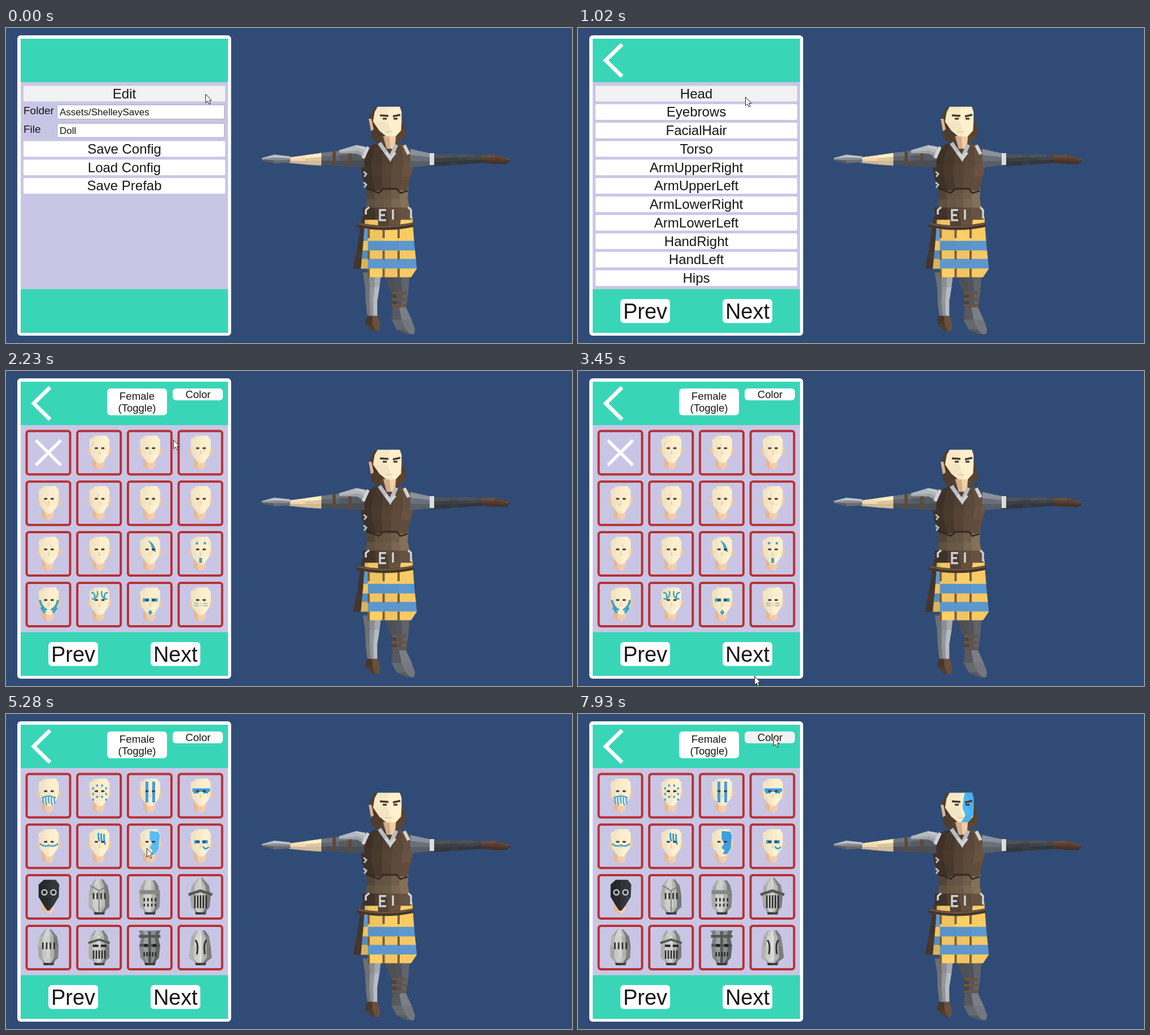
Animation of 1002 by 559 pixels, one loop 8 s. Source, as an HTML page:

```html
<!DOCTYPE html>
<html>
<head>
<meta charset="utf-8">
<style>
html, body { margin: 0; width: 100%; height: 100%; overflow: hidden; background: #304b76 }
svg { display: block; width: 1002px; height: 559px }
text { font-family: "Liberation Sans", Arial, sans-serif; fill: #161616 }
</style>
</head>
<body>
<svg id="stage" viewBox="0 0 1002 559"></svg>
<script>
const range = n => [...Array(n).keys()];
const each = (n, f) => range(n).map(f).join('');
const P = (fill, d) => `<path fill="${fill}" d="${d}"/>`;
const L = (color, width, d) => `<path fill="none" stroke="${color}" stroke-width="${width}" d="${d}"/>`;
const R = (x, y, w, h, fill = '#fff', r = 0, extra = '') =>
  `<rect x="${x}" y="${y}" width="${w}" height="${h}" rx="${r}" fill="${fill}" ${extra}/>`;
const T = (x, y, size, s, anchor = 'middle') =>
  `<text x="${x}" y="${y}" font-size="${size}" text-anchor="${anchor}">${s}</text>`;
const G = (id, body) => `<g id="${id}">${body}</g>`;

let seed = 7;
const random = () => (seed = seed * 16807 % 2147483647) / 2147483647;
const shade = (hex, k) => `rgb(${[1, 3, 5].map(i => Math.min(255, Math.round(parseInt(hex.slice(i, i + 2), 16) * k)))})`;
const mix = (a, b, t) => a + (b - a) * t;

// Faceted surface through sections [position, near edge, far edge]; flat surfaces run left to right
function mesh(sections, cols, base, light = [.68, 1.14], flat = false, noise = .14) {
  const at = ([s, a, b], t) => flat ? [s, mix(a, b, t)] : [mix(a, b, t), s];
  const facet = (i, j) => {
    const [a, b] = [sections[i], sections[i + 1]], t = j / cols, u = (j + 1) / cols;
    const hex = typeof base === 'string' ? base : base(i, j);
    const k = typeof light === 'function' ? light((t + u) / 2) : mix(...light, (t + u) / 2);
    const fill = shade(hex, k + (random() - .5) * noise);
    return `<path fill="${fill}" stroke="${fill}" stroke-width=".6" d="M${at(a, t)}L${at(a, u)}L${at(b, u)}L${at(b, t)}z"/>`;
  };
  return each(sections.length - 1, i => each(cols, j => facet(i, j)));
}

// Panel views
const button = (x, y, w, h, r) => R(x, y, w, h, '#fff', r, 'class="button"');
const row = (i, s) => button(31, 102.6 + 32.75 * i, 357, 27.6, 2) + T(209.5, 124.7 + 32.75 * i, 24, s);
const field = (y, label, value) => T(31, y + 17, 19, label, 'start') +
  R(90.5, y + .5, 296, 25, '#fff', 2, 'stroke="#aaa8bd"') + T(95, y + 19, 17, value, 'start');
const mainView = row(0, 'Edit') + field(136, 'Folder', 'Assets/ShelleySaves') + field(168.7, 'File', 'Doll') +
  ['Save Config', 'Load Config', 'Save Prefab'].map((s, i) => row(i + 3, s)).join('');
const listView = ['Head', 'Eyebrows', 'FacialHair', 'Torso', 'ArmUpperRight', 'ArmUpperLeft', 'ArmLowerRight',
  'ArmLowerLeft', 'HandRight', 'HandLeft', 'Hips'].map((s, i) => row(i, s)).join('');
const nav = L('#fff', 7, 'M78 29L49 57.500 78 86') +
  ['Prev', 'Next'].map((s, i) => button(75 + 181 * i, 481, 88, 42.5, 6) + T(119 + 181 * i, 516, 38, s)).join('');
const options = button(179, 31, 106, 47.5, 6) + T(232, 51, 18.7, 'Female') + T(232, 72, 18.5, '(Toggle)') +
  button(295, 31, 89, 21, 6) + T(340, 48, 18.7, 'Color');

// Heads, drawn around the tile centre
const pair = s => s + `<g transform="translate(2) scale(-1 1)">${s}</g>`;
const cyan = '#3fa3c0', blue = '#3d9fdf';
const neck = mesh([[8, -11, 10], [24, -12, 9], [29, -5, 4]], 3, '#f3c9a8', [.93, 1.04], false, .05);
const skull = neck + pair(P('#ecc7a5', 'M18-9l5 2l-3 12l-3-2z')) +
  mesh([[-30, -7, 13], [-23, -17, 18], [-7, -16, 18], [4, -14, 16], [15, -6, 8], [18, -3, 5]], 4, '#fbedcb',
    [.95, 1.03], false, .03) + P('#eed4ae', 'M1-6l2 9h-5z');
const eyes = pair(R(4, -9.5, 5.5, 3, '#453a34'));
const painted = (...marks) => skull + marks.join('') + eyes;
const scarred = i => painted(L('#e0c09c', 1, `M${i * 7 % 19 - 9} ${-20 + i * 5 % 17}l${i % 4 * 3 - 4} 9`));
const bar = pair(R(3, -11, 11, 6, cyan));

const page1 = [
  L('#fff', 5.5, 'M-22-22L22 22M22-22L-22 22'), ...range(9).map(scarred),
  painted(P(cyan, 'M-3-24Q9-20 11-3L4-6Q4-16-3-24z')),
  painted(pair(R(6, -21, 4, 4, cyan)), R(-2, 7, 5, 9, cyan)),
  painted(pair(L(cyan, 4, 'M17-8Q15 5 5 10M15 5L8 15'))),
  painted(pair(L(cyan, 2.5, 'M5-24Q3-15 9-11M16-21Q8-22 10-10H15'))),
  painted(bar, P(cyan, 'M1 9l4 5l-4 5l-4-5z')),
  painted(pair(each(2, i => L('#8fb0b4', 1.6, `M5 ${4 * i - 2}h8`))))];

const rim = t => 1.08 - 1.9 * (t - .42) ** 2;
const slits = (n, y, h) => each(n, i => R(mix(-11, 9, i / (n - 1)), y, 2.6, h, '#2b2d2f'));
const shell = (top, tip, jaw, base = '#c3c4c0') => mesh([[18, -11, 12], [31, -8, 9]], 2, '#3a3d40') +
  mesh([[top, -tip, tip], [-20, -15, 15], [-2, -18, 18], [18, -jaw, jaw], [27, -8, 8]], 5, base, rim, false, .08);
const steel = '#555958';
const helmets = [
  shell(-31, 7, 18) + L('#7c7f7d', 2, 'M-15-20L0-11L15-20M0-11V26') + slits(4, -7, 11),
  shell(-29, 9, 17) + R(-18, -12, 36, 7, '#858886') + slits(4, 2, 6) + slits(4, 12, 5),
  shell(-34, 3, 16) + L(steel, 5, 'M-21-4L0-11L21-4') + slits(5, -3, 23),
  shell(-32, 5, 17) + slits(4, -9, 12),
  shell(-30, 8, 18) + L(steel, 4, 'M-19-8L0-14L19-8') + pair(R(3, -5, 10, 4, '#222')) + slits(5, 5, 15),
  shell(-30, 19, 16, '#929593') + L(steel, 5, 'M-19-20H19M-18-4H18M0-29V27') + pair(R(5, -6, 7, 5, '#222')) + slits(5, 8, 8),
  shell(-30, 8, 20) + pair(L('#303334', 3, 'M11-13Q5-8 8 12')) + L('#e3e4df', 2, 'M0-28V25')];
const mask = neck + mesh([[-30, -8, 13], [-22, -17, 19], [0, -17, 18], [15, -8, 9], [24, -2, 2]], 4, '#303337') +
  pair('<circle cx="9" cy="-8" r="4.5" fill="#25282c" stroke="#c3c4c2" stroke-width="2.5"/>');

const page2 = [
  painted(L(blue, 2.2, 'M-12 4Q1-3 13 4' + each(5, i => `M${5 * i - 9} 2q-2 6 1 ${12 + i % 2 * 3}`))),
  painted(pair(each(6, i => R(4 + i % 2 * 7, -20 + 5 * i, 3, 4, blue)))),
  painted(pair(R(4.5, -25, 5, 37, blue))),
  painted(R(-14, -13, 31, 6, blue), pair(R(5, -10, 9, 6, blue))),
  painted(L(blue, 2.5, 'M-15-5Q-8 2 1-2Q10 2 17-5')),
  painted(L(blue, 3, each(3, i => `M${5 * i - 1}-${24 - i}q-1 10 2 ${15 + 2 * i}`))),
  skull + `<path id="swatch" d="M0-27L15-26L18-20L16 4L9 14H2L5 7L0 3L4-5L0-13z"/>` + eyes,
  painted(pair(R(3, -11, 10, 6, blue)), L(blue, 3, 'M5 0Q8 8 15 1')),
  mask, ...helmets];
const grid = tiles => tiles.map((body, i) =>
  `<g transform="translate(${75 + i % 4 * 89.7} ${145 + (i >> 2) * 89.8})">` +
  R(-38.5, -38.5, 77, 77, 'none', 4, 'stroke="#b83033" stroke-width="4"') + body + '</g>').join('');

// Figure
const limb = (sections, base, light = [1.2, .62]) => mesh(sections, 3, base, light, true);
const yellow = '#ffd067', sky = '#5f9bd3', leather = '#594637', metal = '#d0d2d5';
const legs = mesh([[434, 632, 664], [460, 636, 661], [485, 637, 657], [512, 640, 657]], 3, '#a0a3a8', [.55, 1.2]) +
  mesh([[511, 639, 658], [525, 636, 662], [537, 648, 661]], 2, '#624b3a') +
  mesh([[440, 671, 714], [468, 681, 712], [496, 685, 708]], 3, '#5f636a') +
  each(3, i => R(683, 468 + 11 * i, 26, 5, '#6a5443')) +
  mesh([[496, 685, 708], [518, 683, 718], [535, 692, 724], [543, 710, 722]], 2, '#767a80');
const hem = [334, 357, 378, 395, 410, 427, 442];
const skirt = mesh(hem.slice(0, 6).map((y, i) => [y, 630 - 3 * i, 642]), 2, (i, j) => !j ? '#4b3b30' : i % 2 ? sky : yellow, [.9, .92]) +
  mesh(hem.map((y, i) => [y, 641, i < 6 ? 719 + 1.6 * i : 717]), 3, (i, j) => i % 2 || !i ? yellow : sky, [.96, .98], false, .06) +
  each(9, i => R(640 + 26.5 * (i % 3), hem[1 + 2 * (i / 3 | 0)], 4, 16, '#78603f')) +
  mesh([[336, 659, 699], [353, 659, 697]], 2, '#6a5543') +
  L('#45362b', 8, 'M621 349Q670 360 721 349') + L('#6c5542', 3, 'M623 347Q670 358 720 347');
const torso = mesh([[282, 638, 712], [304, 639, 711], [323, 637, 715]], 5, '#78654f', [.72, 1.08]) +
  mesh([[206, 652, 704], [216, 635, 718], [242, 628, 722], [264, 631, 716], [288, 640, 710]], 5, leather, [.64, 1.16]) +
  L('#302721', 2.5, 'M638 284L660 293L668 285H692L698 293L711 289') +
  mesh([[319, 631, 718], [340, 634, 718]], 4, '#5d4a3b') +
  L(metal, 3.5, 'M673 323H662V341H673M662 332H671M685 322V340M643 318L637 323V331M712 318L717 323V338') +
  L('#b9bbbe', 3, each(2, i => `M633 ${255 + 19 * i}l5 4l-4 5`));
const arms = limb([[557, 222, 242], [590, 218, 245], [634, 211, 247]], '#62676f') +
  each(2, i => R(578 + 28 * i, 219, 6, 25, '#5d493b')) +
  limb([[590, 217, 222], [620, 208, 222], [636, 211, 230]], '#b6babf', [1.1, .8]) +
  limb([[501, 230, 239], [530, 226, 242], [558, 222, 244]], '#f4dab0', [1.1, .78]) +
  limb([[453, 231, 235], [475, 225, 240], [503, 228, 238]], '#a2a7ae', [1.3, .45]) +
  limb([[716, 215, 247], [757, 224, 243]], '#777e88') +
  limb(range(7).map(i => [757 + 14.5 * i, 224 + i % 2, 245 - i]), '#44494f', [1.15, .72]) +
  R(750, 222, 8, 21, '#dcdcdb') + limb([[842, 226, 239], [866, 225, 241], [886, 231, 241], [892, 233, 236]], '#5d4336');
const head = mesh([[141, 652, 699], [160, 643, 701], [180, 647, 707], [193, 646, 707], [204, 656, 694]], 4, '#55412f', [.9, 1.05]) +
  P('#e0b18f', 'M642 161l5 0l4 19l-5 3z') + mesh([[192, 668, 690], [214, 674, 688]], 2, '#f0c8a0', [.9, 1.03]) +
  L('#b9bdc2', 7, 'M661 204L680 231L691 207') + L(metal, 5, 'M672 221L681 231L689 221') +
  L(metal, 6, 'M641 211L632 231M705 208L713 224') +
  mesh([[140, 658, 697], [149, 653, 700], [166, 650, 700], [182, 661, 699], [192, 673, 690]], 2, '#fdeeca', [.96, 1.01], false, .03) +
  G('warpaint', mesh([[140, 685, 698], [149, 683, 700], [166, 681, 700], [180, 686, 699], [192, 679, 690]], 2, '#49b0ee', [1.05, .95], false, .08)) +
  L('#4d392d', 3.5, 'M662 155L677 156M685 157L698 154') + L('#353238', 3, 'M667 161H674M686 161H693') +
  L('#d5b58a', 1, 'M671 184H684');

const stage = document.getElementById('stage');
stage.innerHTML = R(0, 0, 1002, 559, '#304b76') + legs + skirt + torso + arms + head +
  R(20, 13, 378.5, 533, '#fff', 6) + R(26, 19, 367, 522, '#38d6b7') + R(26, 96, 367, 367.5, '#c9c6e5') +
  G('main', mainView) + G('list', listView) + G('page1', grid(page1)) + G('page2', grid(page2)) +
  G('nav', nav) + G('options', options) +
  G('cursor', '<path fill="#fff" stroke="#222" d="M.5.5V16L4 12.700 6.500 18 9 17 6.600 11.700H11z"/>');

// Pointer stops as [tick, x, y]; the recording advances in coarse ticks
const stops = [[0, 353, 117], [2, 296, 122], [15, 296, 122], [17, 312, 541], [18, 310, 511], [21, 310, 511],
  [26, 249, 238], [31, 250, 238], [36, 346, 41], [40, 346, 41]];
const clicks = [4, 10, 18];
const el = id => document.getElementById(id);
const show = (id, on) => el(id).style.display = on ? '' : 'none';
const buttons = [...document.querySelectorAll('.button')];
const within = (v, from, size) => v >= from && v <= from + size;
const ease = t => t * t * (3 - 2 * t);

function draw(time) {
  const tick = Math.floor((time % 8000 + 15) / 203);
  const n = stops.findIndex(s => s[0] > tick), a = stops[n - 1], b = stops[n];
  const t = ease((tick - a[0]) / (b[0] - a[0])), x = mix(a[1], b[1], t), y = mix(a[2], b[2], t);
  const view = tick < 5 ? 'main' : tick < 11 ? 'list' : tick < 19 ? 'page1' : 'page2';
  for (const id of ['main', 'list', 'page1', 'page2']) show(id, id === view);
  show('nav', view !== 'main');
  show('options', view.startsWith('page'));
  show('warpaint', tick >= 28);
  for (const r of buttons) {
    const [bx, by, w, h] = ['x', 'y', 'width', 'height'].map(k => +r.getAttribute(k));
    const over = within(x, bx, w) && within(y, by, h);
    r.setAttribute('fill', !over ? '#fff' : clicks.includes(tick) ? '#c8c8c8' : '#f2f2f2');
  }
  el('swatch').setAttribute('fill', within(x, 214, 80) && within(y, 194, 80) ? '#58bdf5' : blue);
  el('cursor').setAttribute('transform', `translate(${x} ${y})`);
}
const start = performance.now();
function loop() {
  draw(performance.now() - start);
  requestAnimationFrame(loop);
}
draw(0);
requestAnimationFrame(loop);
</script>
</body>
</html>
```
